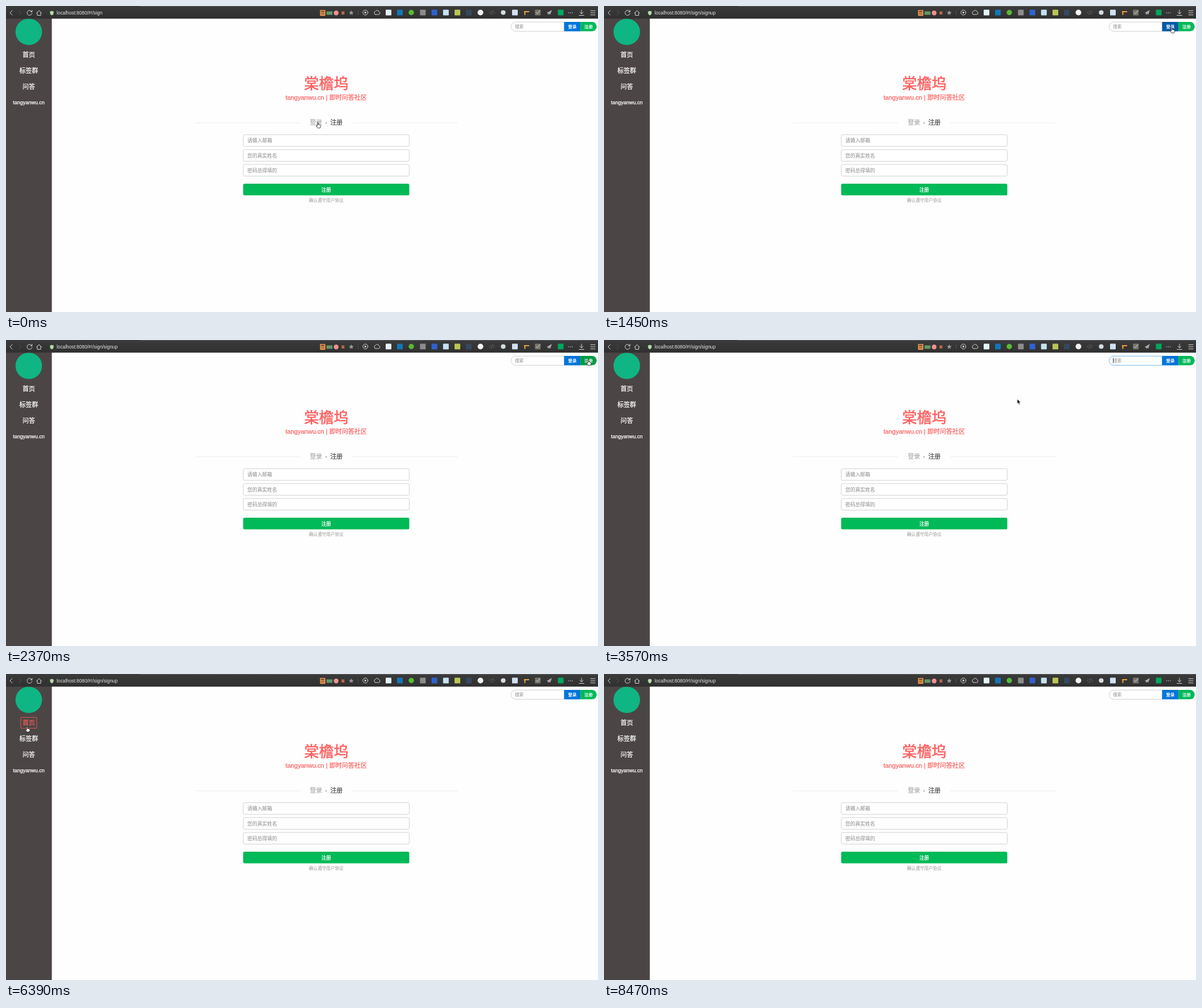
An HTML page for the animation above (8920 ms loop, 1040 by 539 pixels).

```html
<!DOCTYPE html>
<html lang="zh">
<head>
<meta charset="utf-8">
<title>Sign up</title>
<style>
html, body { margin: 0; width: 100%; height: 100%; overflow: hidden; background: #fefefe; }
svg { display: block; width: 1040px; height: 539px; }
text { font-family: "Liberation Sans", "Noto Sans CJK SC", "Noto Sans CJK", sans-serif; }
.med { stroke: currentColor; stroke-width: .25px; }
.line { fill: none; stroke: #d6d6d6; stroke-width: 1; stroke-linecap: round; stroke-linejoin: round; }
</style>
</head>
<body>
<svg id="stage" viewBox="0 0 1040 539"></svg>
<script>
const LOOP = 8920;
const GREEN = '#00b957', BLUE = '#0275d8', RED = '#ff5f5f';

// --- drawing helpers ---
const rect = (x, y, w, h, fill, extra = '') =>
  `<rect x="${x}" y="${y}" width="${w}" height="${h}" fill="${fill}" ${extra}/>`;
const dot = (x, y, r, fill) => `<circle cx="${x}" cy="${y}" r="${r}" fill="${fill}"/>`;
const line = (d, extra = '') => `<path class="line" d="${d}" ${extra}/>`;
// text is centred vertically on cy
const text = (x, cy, size, fill, str, opt = '') =>
  `<text x="${x}" y="${cy + size * .37}" font-size="${size}" fill="${fill}" color="${fill}" ${opt}>${str}</text>`;
const mid = 'text-anchor="middle"';
const midMed = mid + ' class="med"';
const tile = (x, fill, s = 10) => rect(x - s / 2, 11.5 - s / 2, s, s, fill, 'rx="1"');

function toolbar() {
  return rect(0, 0, 1040, 22.3, 'url(#bar)') +
    rect(138, 0, .7, 1.5, '#222') + rect(235, 0, 805, 1, '#5c5c5c') +
    line('M11 8L7 12L11 16') +
    line('M22.5 8L26.5 12L22.5 16', 'style="stroke:#555"') +
    line('M45.3 10A4.4 4.4 0 1 0 45.7 13M45.8 7.5V10.3H43') +
    line('M53.5 12.5L58 8L62.5 12.5M55 11.5V16.5H61V11.5') +
    '<path d="M77.3 9.6Q79 9.6 80.5 8.6Q82 9.6 83.7 9.6V12.5Q83.5 15.2 80.5 16.6Q77.5 15.2 77.3 12.5Z" fill="#b5d9a8"/>' +
    rect(551.7, 7, 9.3, 10.2, '#f39a4c', 'rx="1"') +
    rect(553.2, 8.5, 6.3, 2, '#59422e') + rect(553.2, 12, 6.3, .8, '#59422e') + rect(553.2, 14.2, 6.3, .8, '#59422e') +
    rect(563, 9.5, 10.5, 6, '#5d9a6c') +
    dot(580, 12.2, 4.2, '#ef8f90') +
    rect(589.5, 9.5, 5, 5.5, '#b5694d') +
    '<path d="M606.5 7.6L607.7 10.5L610.8 10.7L608.4 12.7L609.2 15.7L606.5 14L603.8 15.7L604.6 12.7L602.2 10.7L605.3 10.5Z" fill="#9b9b9b"/>' +
    rect(618, 8, .8, 8, '#5a5a5a') +
    '<circle class="line" cx="631.3" cy="11.5" r="4.4"/><path d="M630 9.3L633.7 11.5L630 13.7Z" fill="#d6d6d6"/>' +
    line('M649 15H654.5A2.4 2.4 0 0 0 655.3 10.3A3.4 3.4 0 0 0 649 9.4A2.9 2.9 0 0 0 649 15') +
    tile(672, '#e4f2fb') + tile(692, '#1376b6') + dot(712, 11.5, 4.7, '#55bb35') +
    tile(732.3, '#8b8b8b') + tile(752.6, '#2f62d0') + tile(772.8, '#c4e2f2') +
    tile(793, '#b9c653') + tile(813, '#34495e') + dot(833.5, 11.5, 5, '#f2f2f2') +
    line('M851.5 9L849 11.5L851.5 14M856 9L858.5 11.5L856 14M854.7 8L852.8 15', 'style="stroke:#666"') +
    dot(873.5, 11.5, 4.1, '#d5dce1') + tile(894, '#cfe1f3') +
    '<path d="M910 9H919V11H912.5V16H910.8Z" fill="#e9a23c"/>' +
    tile(934.2, '#77756b') + line('M931.5 11.5L933.5 13.5L938 8') +
    '<path d="M950 12L959 7L956 15.5L954 13.5L952 16V13Z" fill="#a9a9a9"/>' +
    tile(974.5, '#00a65e') +
    [988.5, 991.7, 994.9].map(x => dot(x, 12, .8, '#d6d6d6')).join('') +
    line('M1011 7V13.5M1008 11L1011 14L1014 11M1006.7 16.5H1015.3') +
    line('M1027 8.3H1035M1027 12H1035M1027 15.7H1035') +
    text(89, 12.3, 8.3, '#e6e6e6', '', 'id="url"');
}

const menu = [['首页', 86, 11, 28], ['标签群', 114, 11, 39], ['问答', 142, 11, 28], ['tangyanwu.cn', 170, 9, 58]];

function sidebar() {
  return rect(0, 22, 80.5, 517, '#4b4645') + dot(40, 45.5, 23.3, '#0fb582') +
    menu.map(([name, y, size, w]) =>
      `<g class="item">${rect(40 - w / 2, y - 9.5, w, 19, 'none', 'rx="1" stroke-width=".9"')}` +
      text(40, y, size, 'currentColor', name, midMed) + '</g>').join('');
}

function topForm() {
  return '<path id="search" d="M980.5 28.3H895.4A8.1 8.1 0 0 0 895.4 44.5H980.5Z" fill="#fff" stroke="#ccc" stroke-width=".9"/>' +
    text(894.2, 36.3, 7.5, '#8c8c8c', '搜索') +
    rect(894, 32, .8, 8.5, '#333', 'id="caret"') +
    rect(980.5, 28, 28.7, 16.6, BLUE, 'id="in"') +
    '<path id="up" d="M1009.2 28H1029.4A8.3 8.3 0 0 1 1029.4 44.6H1009.2Z"/>' +
    text(995, 36.3, 7.4, '#fff', '登录', midMed) + text(1023.4, 36.3, 7.4, '#fff', '注册', midMed);
}

const field = (y, hint) =>
  rect(416.8, y, 291.6, 20.4, '#fff', 'rx="2.5" stroke="#ccc" stroke-width=".9"') +
  text(424, y + 10.4, 8.7, '#888', hint);
const button = (y, fill, name) =>
  rect(416.6, y, 291.9, 20.5, fill, 'rx="2.5"') + text(562.6, y + 10.3, 8.7, '#fff', name, midMed);

function page() {
  return text(562.8, 136, 26, RED, '棠檐坞', mid + ' class="med" style="stroke-width:.6px"') +
    text(562.5, 160.5, 11, RED, 'tangyanwu.cn | 即时问答社区', midMed) +
    rect(332, 205.3, 185, 1, '#ececec') + rect(608.5, 205.3, 184.5, 1, '#ececec') +
    text(544.6, 205.2, 10.9, 'currentColor', '登录', midMed + ' id="tabIn"') + dot(562.5, 206, 1.3, '#aaa') +
    text(580.6, 205.2, 10.9, 'currentColor', '注册', midMed + ' id="tabUp"') +
    `<g id="signup">${field(226.8, '请输入邮箱')}${field(253, '您的真实姓名')}${field(279.2, '密码总得填的')}` +
    button(313.1, GREEN, '注册') + text(562.6, 342, 7.6, '#999', '确认遵守用户协议', mid) + '</g>' +
    `<g id="signin">${field(226.8, '请输入邮箱')}${field(253, '密码总得填的')}${button(286.9, BLUE, '登录')}</g>`;
}

const pointers =
  '<g id="cursor">' +
  '<path id="arrow" d="M0 0V8.4L1.9 6.7L3.2 9.8L4.7 9.2L3.4 6.2L6 6Z" fill="#111" stroke="#fff" stroke-width=".6"/>' +
  '<path id="hand" d="M-.9 .8a.9 .9 0 0 1 1.8 0V4l.6-.3q.8-.2 1 .5q.9-.4 1.4.4q1-.2 1.2.8V7.2L4 9.7H-.2L-2.8 6.4q-.6-1.1.6-1.2L-.9 6.2Z" fill="#fff" stroke="#111" stroke-width=".8"/>' +
  '<path id="beam" d="M-1.5 0H1.5M0 0V9M-1.5 9H1.5" fill="none" stroke="#222" stroke-width=".8"/></g>';

const stage = document.getElementById('stage');
stage.innerHTML =
  '<defs><linearGradient id="bar" x2="0" y2="1"><stop stop-color="#3b3b3b"/><stop offset="1" stop-color="#303030"/></linearGradient></defs>' +
  rect(0, 0, 1040, 539, '#fefefe') + sidebar() + page() + topForm() + toolbar() + pointers;

// --- timeline: each track holds its value until the next entry ---
const moves = [
  [0, 'hand', 547.8, 205.2], [410, 'hand', 576, 204], [710, 'arrow', 640, 186],
  [860, 'arrow', 760, 140], [1000, 'arrow', 880, 88], [1150, 'arrow', 962, 56],
  [1300, 'hand', 1000, 39], [1450, 'hand', 997.5, 37.8],
  [2050, 'hand', 1005, 37], [2220, 'hand', 1019, 36], [2370, 'hand', 1022.8, 34.8],
  [2520, 'hand', 990, 36], [2670, 'beam', 955, 38], [2820, 'arrow', 954, 48],
  [2970, 'arrow', 953, 61], [3270, 'arrow', 890, 78], [3420, 'arrow', 800, 96],
  [3570, 'arrow', 726, 104], [3870, 'arrow', 500, 140], [4020, 'arrow', 250, 168],
  [4160, 'arrow', 84, 140], [4310, 'hand', 38, 94], [4450, 'hand', 38, 91],
  [4750, 'hand', 37, 112], [4900, 'hand', 36, 122], [5040, 'hand', 35.4, 116],
  [5490, 'hand', 36, 105], [5640, 'hand', 37, 89.5], [6390, 'hand', 37, 92.4],
  [6690, 'arrow', 76, 122], [6840, 'arrow', 119, 202], [6990, 'arrow', 84, 168],
  [7130, 'hand', 44, 139], [7580, 'hand', 37, 139.5], [7880, 'hand', 38, 171],
  [8030, 'arrow', 250, 260], [8180, 'arrow', 640, 400], [8320, 'arrow', 1012, 512], [8470, '', 0, 0]
];
const forms = [[0, 'signup'], [140, 'signin'], [560, 'signup'], [1900, 'signin'], [2370, 'signup']];
const paths = [[0, ''], [560, '/signup'], [1750, ''], [2220, '/signup']];
const hovers = [
  [0, ''], [1300, 'in'], [2220, 'up'], [2520, 'in'], [2670, ''], [4450, 0], [4750, 1], [5490, ''],
  [5640, 0], [6690, ''], [7130, 2], [7880, 3], [8030, '']
];
const focus = [[0, false], [2670, true], [3720, false]];

const at = (track, t) => track.findLast(k => k[0] <= t);
const el = id => document.getElementById(id);
const set = (node, attrs) => { for (const k in attrs) node.setAttribute(k, attrs[k]); };
const show = (id, on) => set(el(id), { visibility: on ? 'visible' : 'hidden' });
const items = [...document.querySelectorAll('.item')];
const tab = (id, on) => {
  const c = on ? '#505050' : '#b0b0b0';
  set(el(id), { fill: c, color: c });
};

function draw(t) {
  const [, kind, x, y] = at(moves, t);
  const form = at(forms, t)[1], hover = at(hovers, t)[1], active = at(focus, t)[1];
  el('url').textContent = 'localhost:8080/#!/sign' + at(paths, t)[1];
  for (const id of ['signup', 'signin']) show(id, id === form);
  tab('tabIn', form === 'signin');
  tab('tabUp', form === 'signup');
  set(el('in'), { fill: hover === 'in' ? '#025aa5' : BLUE });
  set(el('up'), { fill: hover === 'up' ? '#009a42' : GREEN });
  set(el('search'), { stroke: active ? '#66afe9' : '#ccc' });
  show('caret', active);
  items.forEach((g, i) => {
    const on = i === hover, c = on ? '#f45b5b' : '#fff';
    set(g.lastChild, { color: c, fill: c });
    set(g.firstChild, { stroke: on ? c : 'none' });
  });
  for (const id of ['arrow', 'hand', 'beam']) show(id, id === kind);
  set(el('cursor'), { transform: `translate(${x} ${y})` });
}

const start = performance.now();
function tick() {
  draw((performance.now() - start) % LOOP);
  requestAnimationFrame(tick);
}
draw(0);
requestAnimationFrame(tick);
</script>
</body>
</html>
```
